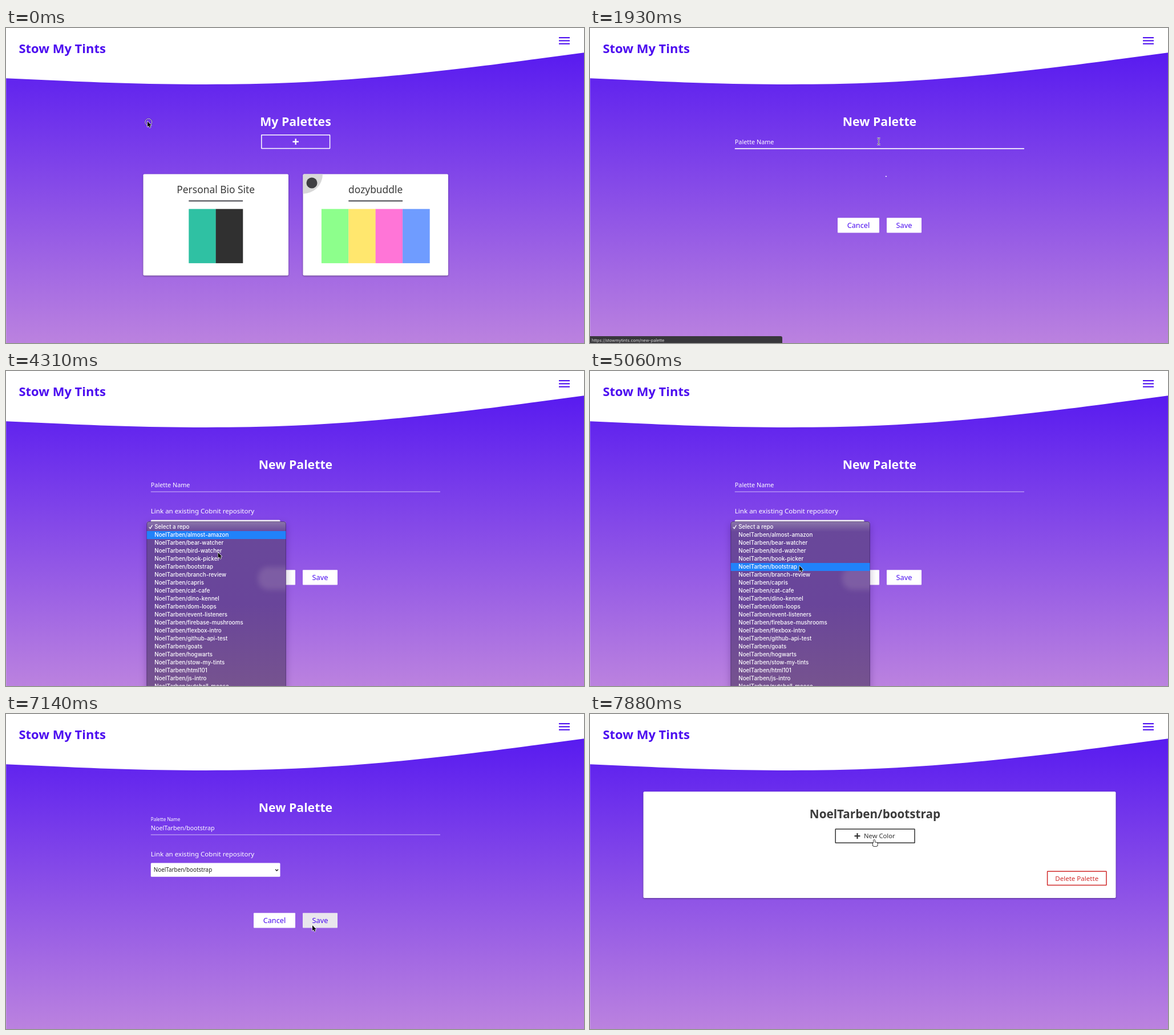
An HTML page with a canvas that plays this animation: 1013x553 px, repeating every 8000 ms.

```html
<!DOCTYPE html>
<html lang="en">
<head>
<meta charset="utf-8">
<title>Palette app demo</title>
<style>
html, body { margin: 0; width: 100%; height: 100%; overflow: hidden; background: #fff; }
canvas { display: block; width: 1013px; height: 553px; }
</style>
</head>
<body>
<canvas id="stage" width="1013" height="553"></canvas>
<script>
const W = 1013, H = 553, LOOP = 8000, STEP = 148.6;
const canvas = document.getElementById('stage');
const ctx = canvas.getContext('2d');
const UI = '"Noto Sans", sans-serif', SYSTEM = 'Inter, sans-serif';
const BRAND = '#4c0df0', INK = '#3b3b3b', WHITE = '#fff', RED = '#d02a2a';
const USER = 'NoelTarben', REPO = USER + '/bootstrap';
const REPOS = ('almost-amazon bear-watcher bird-watcher book-picker bootstrap branch-review capris ' +
  'cat-cafe dino-kennel dom-loops event-listeners firebase-mushrooms flexbox-intro github-api-test ' +
  'goats hogwarts stow-my-tints html101 js-intro nutshell-moose').split(' ');

// Steps at which the interface changes
const OPEN_FORM = 12, SPINNER = 13, HIDE_URL = 16, LOADED = 19, MENU = 27, PICK = 33,
  CHOSEN = 35, FILLED = 36, BLUR = 42, SAVED = 50;

const field = { x: 253.8, y: 193, w: 507.2, h: 19 };
const addButton = { x: 447.8, y: 187.8, w: 119.8, h: 23.6 };
const saveButton = { x: 520, y: 349.2, w: 61, h: 26.3 };
const colorButton = { x: 430.2, y: 202, w: 138.8, h: 24.2 };
const inside = (p, b) => p.x >= b.x && p.x <= b.x + b.w && p.y >= b.y && p.y <= b.y + b.h;

const MOVES = [
  { from: 0, to: 7, x: 500, y: 187 },
  { from: 7, to: 10, x: 506, y: 199 },
  { from: 13, to: 17, x: 500, y: 199 },
  { from: 21, to: 26, x: 380, y: 276 },
  { from: 26, to: 31, x: 367, y: 342 },
  { from: 39, to: 47, x: 537, y: 371, sag: 45 },
  { from: 49, to: 53, x: 498, y: 221 }
];

const ease = t => t * t * (3 - 2 * t);
const clamp = (v, lo, hi) => Math.min(hi, Math.max(lo, v));

function pointer(k) {
  let x = 248, y = 164;
  for (const m of MOVES) {
    const f = ease(clamp((k - m.from) / (m.to - m.from), 0, 1));
    x += (m.x - x) * f;
    y += (m.y - y) * f + (m.sag || 0) * Math.sin(Math.PI * f);
  }
  return { x, y };
}

function text(str, x, y, size, color, { weight = 400, align = 'left', font = UI } = {}) {
  ctx.font = `${weight} ${size}px ${font}`;
  ctx.textAlign = align;
  ctx.fillStyle = color;
  ctx.fillText(str, x, y);
}

function rect(x, y, w, h, color) {
  ctx.fillStyle = color;
  ctx.fillRect(x, y, w, h);
}

function box(x, y, w, h, r, fill) {
  ctx.beginPath();
  ctx.roundRect(x, y, w, h, r);
  ctx.fillStyle = fill;
  ctx.fill();
}

function outline({ x, y, w, h }, color, width = 1.5, r = 0.5) {
  ctx.beginPath();
  ctx.roundRect(x, y, w, h, r);
  ctx.strokeStyle = color;
  ctx.lineWidth = width;
  ctx.stroke();
}

function circle(x, y, r) {
  ctx.beginPath();
  ctx.arc(x, y, r, 0, Math.PI * 2);
}

function line(color, width, ...points) {
  ctx.beginPath();
  points.forEach(([x, y]) => ctx.lineTo(x, y));
  ctx.strokeStyle = color;
  ctx.lineWidth = width;
  ctx.stroke();
}

function plus(x, y, size, color) {
  const t = size * 0.22;
  rect(x - size / 2, y - t / 2, size, t, color);
  rect(x - t / 2, y - size / 2, t, size, color);
}

function withShadow(color, blur, offset, draw) {
  ctx.save();
  ctx.shadowColor = color;
  ctx.shadowBlur = blur;
  ctx.shadowOffsetY = offset;
  draw();
  ctx.restore();
}

function card(x, y, w, h) {
  withShadow('rgba(0,0,0,.4)', 3, 1, () => box(x, y, w, h, 2, WHITE));
}

function vertical(y0, y1, ...colors) {
  const g = ctx.createLinearGradient(0, y0, 0, y1);
  colors.forEach((c, i) => g.addColorStop(i / (colors.length - 1), c));
  return g;
}

function backdrop() {
  rect(0, 0, W, H, vertical(0, H, '#5012f1', '#bb82df'));
  rect(0, 88, 1, H - 88, 'rgba(255,255,255,.2)');
  ctx.save();
  ctx.translate(0, -1.7);
  ctx.scale(W / 1440, W / 1440);
  ctx.fillStyle = WHITE;
  ctx.fill(new Path2D('M0,128L120,133.3C240,139,480,149,720,138.7C960,128,1200,96,1320,80L1440,64V0H0Z'));
  ctx.restore();
  text('Stow My Tints', 22.5, 43.5, 21.95, BRAND, { weight: 700 });
  for (let i = 0; i < 3; i++) rect(969, 16 + i * 5.3, 19, 2.1, BRAND);
}

function heading(str) {
  text(str, 507.5, 171.5, 21.25, WHITE, { weight: 700, align: 'center' });
}

function paletteCard(x, title, colors) {
  const mid = x + 127.2, w = 47.4, left = mid - colors.length * w / 2;
  card(x, 256.5, 254.5, 178);
  text(title, mid, 289.8, 17.4, INK, { align: 'center' });
  rect(mid - w, 302.6, w * 2, 1.9, '#3d3d45');
  colors.forEach((c, i) => rect(left + i * w, 317.7, w + 0.2, 95.2, c));
}

function homePage(cursor) {
  heading('My Palettes');
  const { x, y, w, h } = addButton;
  if (inside(cursor, addButton)) rect(x, y, w, h, 'rgba(255,255,255,.15)');
  outline(addButton, WHITE);
  plus(x + w / 2, y + h / 2, 10.5, WHITE);
  paletteCard(240.5, 'Personal Bio Site', ['#2fc1a3', '#303030']);
  paletteCard(520.5, 'dozybuddle', ['#8dff8c', '#ffe76e', '#ff75d7', '#6f9cff']);
  box(520.5, 256.5, 34.5, 34.5, [2, 0, 34.5, 0], '#d8d8d8');
  circle(536, 272, 9.5);
  ctx.fillStyle = '#3f3f42';
  ctx.fill();
}

function button(label, { x, y, w, h }, fill = WHITE) {
  box(x, y, w, h, 1, fill);
  text(label, x + w / 2, y + 17.6, 12.75, BRAND, { align: 'center' });
}

function selectField(value, focused) {
  const area = { x: 253.8, y: 261.5, w: 226.7, h: 24.3 };
  box(area.x, area.y, area.w, area.h, 1.5, WHITE);
  if (focused) {
    outline(area, WHITE, 2, 2);
    outline({ x: area.x + 0.9, y: area.y + 0.9, w: area.w - 1.8, h: area.h - 1.8 }, '#0a62d0', 1.4, 1.5);
  }
  text(value, 258.8, 277.2, 9.85, '#222');
  line('#222', 1.4, [472.2, 272.7], [474.6, 275.3], [477, 272.7]);
}

function dropdown(k) {
  const menu = { x: 246.8, y: 264.5, w: 243.6, h: 320 }, row = 14, top = 267;
  const { x, y, w, h } = menu;
  ctx.save();
  if (k === CHOSEN) ctx.globalAlpha = 0.4;
  withShadow('rgba(30,0,70,.3)', 14, 4, () =>
    box(x, y, w, h, 4, vertical(y, H, '#69489a', '#69459a', '#76538f')));
  // Light of the field and the button behind the translucent menu
  rect(x, y, w, 18, vertical(y, y + 18, 'rgba(190,185,195,.4)', 'rgba(190,185,195,0)'));
  ctx.save();
  ctx.beginPath();
  ctx.rect(x, y, w, H - y);
  ctx.clip();
  ctx.filter = 'blur(5px)';
  box(442, 344, 80, 40, 18, 'rgba(180,155,190,.28)');
  ctx.restore();
  outline(menu, 'rgba(50,25,80,.65)', 0.8, 4);

  const active = clamp(2 * (k - MENU) - 3, 0, 5);
  if (k !== PICK) rect(x, top + active * row, w, row, '#2182fa');
  line(WHITE, 1.2, [250.8, 273.8], [252.8, 276.6], [256.4, 270.6]);
  ['Select a repo', ...REPOS.map(name => USER + '/' + name)].forEach((label, i) =>
    text(label, 260.3, top + 10 + i * row, 9.75, WHITE, { font: SYSTEM, weight: 500 }));
  ctx.restore();
}

function formPage(k, cursor) {
  heading('New Palette');
  const loaded = k >= LOADED, chosen = k >= CHOSEN;
  const lift = clamp((k - CHOSEN) * 0.58, 0, 1);
  const bold = { weight: 500 };
  text('Palette Name', field.x, 204.4 - 16.4 * lift, 10.8 * (1 - 0.25 * lift), WHITE, bold);
  if (k >= FILLED) text(REPO, field.x, 204.4, 10.75, WHITE, bold);
  if (inside(cursor, field)) rect(field.x, 210.9, field.w, 1.7, WHITE);
  else rect(field.x, 211.5, field.w, 1, 'rgba(255,255,255,.65)');

  if (loaded) {
    text('Link an existing Cobnit repository', field.x, 250, 11.55, WHITE, bold);
    selectField(chosen ? REPO : 'Select a repo', chosen && k < BLUR);
  } else if (k >= SPINNER) {
    box(517.6, 259.7, 2.6, 1.6, 0.8, WHITE);
  }
  const y = saveButton.y - (loaded ? 0 : 16);
  button('Cancel', { ...saveButton, x: 434, y, w: 73 });
  button('Save', { ...saveButton, y }, inside(cursor, saveButton) ? '#e9e6ed' : WHITE);
  if (k >= MENU && k <= CHOSEN) dropdown(k);
  if (k < HIDE_URL) {
    box(-4, 541, 341, 16, 3, '#38373b');
    text('https://stowmytints.com/new-palette', 3, 550.5, 7.3, '#dcdcdc', { font: SYSTEM });
  }
}

function detailPage() {
  card(93.5, 136.3, 828, 186.7);
  text(REPO, 499.5, 183, 20.7, INK, { weight: 700, align: 'center' });
  outline(colorButton, '#333');
  plus(468.5, 214.2, 10, '#333');
  text('New Color', 480, 218.2, 11.25, '#333');
  outline({ x: 801.6, y: 276.2, w: 103.4, h: 24.2 }, RED);
  text('Delete Palette', 853.2, 292.8, 11.55, RED, { align: 'center' });
}

const arrowPath = new Path2D('M0,0V9.5L2.2,7.5L3.8,11L5.4,10.3L3.9,6.9H6.8Z');
const handPath = new Path2D();
handPath.roundRect(-0.9, 0, 2.2, 8, 1);
handPath.roundRect(-2.2, 4.4, 8, 6.6, 2);
const beamPath = new Path2D('M-2.6,-5.5H-1L0,-4.4L1,-5.5H2.6M0,-4.4V4.4M-2.6,5.5H-1L0,4.4L1,5.5H2.6');

function traced(path, color, width, fill) {
  ctx.lineJoin = 'round';
  ctx.strokeStyle = color;
  ctx.lineWidth = width;
  ctx.stroke(path);
  if (!fill) return;
  ctx.fillStyle = fill;
  ctx.fill(path);
}

const cursors = {
  arrow: () => traced(arrowPath, WHITE, 1.3, '#000'),
  hand: () => traced(handPath, '#000', 1.5, WHITE),
  beam() {
    traced(beamPath, 'rgba(255,255,255,.85)', 2.4);
    traced(beamPath, '#3a3050', 1);
  }
};

function drawCursor(k, cursor) {
  const onForm = k >= OPEN_FORM && k < SAVED;
  const link = k < OPEN_FORM ? addButton : colorButton;
  const kind = onForm ? (inside(cursor, field) ? 'beam' : 'arrow') : (inside(cursor, link) ? 'hand' : 'arrow');
  ctx.save();
  ctx.translate(cursor.x, cursor.y);
  if (k === 0) {
    circle(1.8, 1.2, 6);
    ctx.strokeStyle = 'rgba(30,20,60,.45)';
    ctx.lineWidth = 2;
    ctx.stroke();
    ctx.strokeStyle = 'rgba(255,255,255,.75)';
    ctx.lineWidth = 1;
    ctx.stroke();
  }
  cursors[kind]();
  ctx.restore();
}

function render(t) {
  const k = Math.floor((t + 9) / STEP);
  const cursor = pointer(k);
  backdrop();
  if (k < OPEN_FORM) homePage(cursor);
  else if (k < SAVED) formPage(k, cursor);
  else detailPage();
  drawCursor(k, cursor);
}

const start = performance.now();
function tick() {
  render((performance.now() - start) % LOOP);
  requestAnimationFrame(tick);
}
tick();
</script>
</body>
</html>
```
